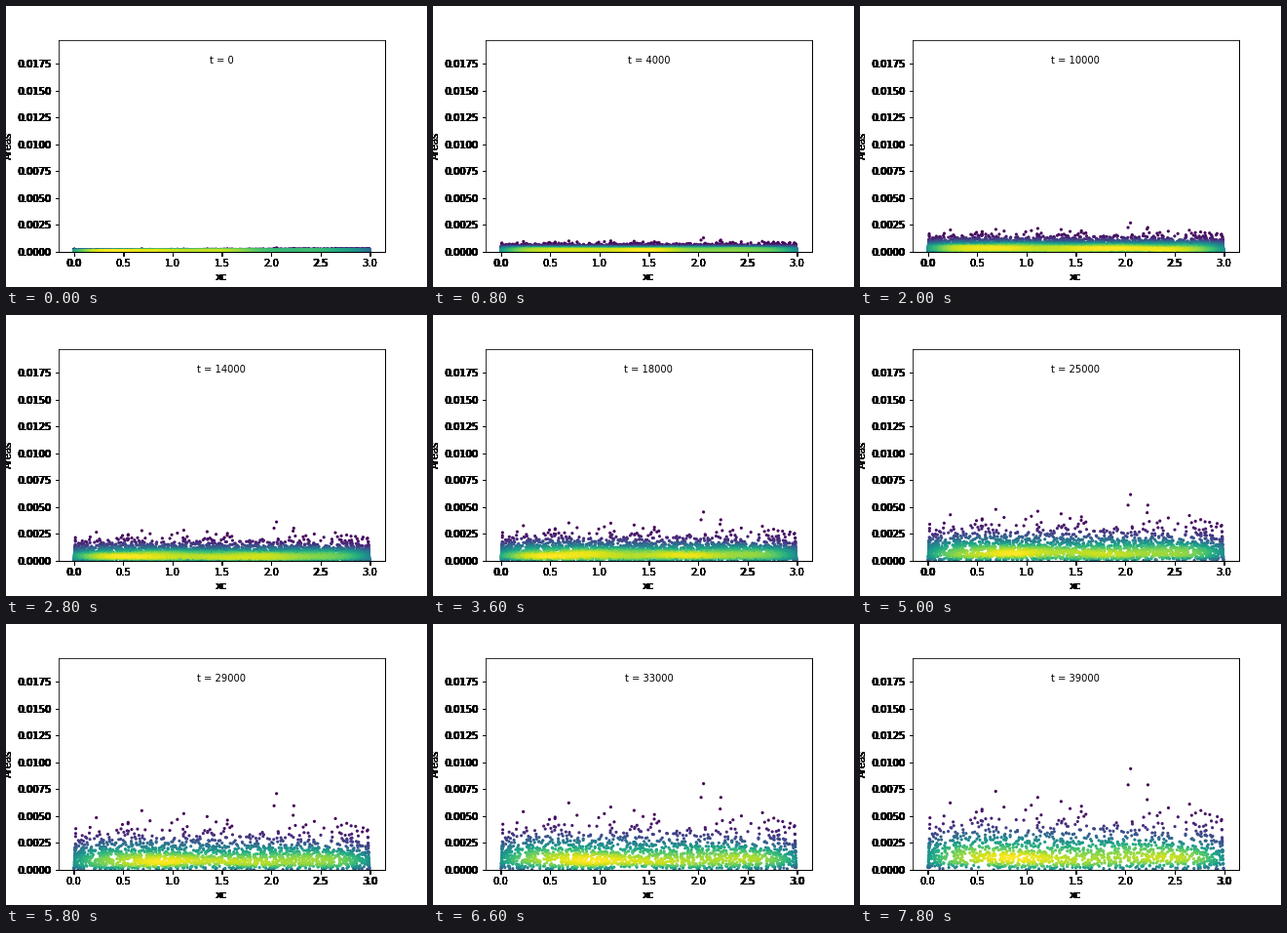
Write a matplotlib script that moves like this. It is 432 px wide and 288 px high and loops after 8 s.

```python
import numpy as np
import matplotlib.pyplot as plt
from matplotlib.animation import FuncAnimation

FRAMES, STEP_MS = 40, 200
N0 = 13000
RECT = [0.125, 0.125, 0.775, 0.755]
PX = 1 / 432
Y_TOP = 0.019716
BINS = 200

# Position and final area of the few largest cells
GIANT_X = np.array([2.055, 2.03, 2.23, 0.69])
GIANT_AREA = np.array([0.0094, 0.0079, 0.0079, 0.0073])

rng = np.random.default_rng(12)
rank = rng.permutation(np.linspace(0, 1 - 3 / N0, N0))
tilt = 0.15
home = 3 * (1 - np.sqrt(1 - rng.random(N0) * (2 * tilt - tilt**2))) / tilt
side = rng.random(N0)
at_left, at_right = side < 0.014, side > 0.986


def typical_area(t):
    return 0.00008 + 0.000049 * t


def cells(t):
    """Positions and areas of the cells still alive at time t (thousands)."""
    start = np.exp(-t / 1.5)
    scale = typical_area(t)
    share = min(1, 3 / scale / N0)
    alive = rank >= 1 - share
    q = (rank[alive] - 1 + share) / share
    x = home[alive]
    area = (scale + 0.00006 * start) * (-np.log(1 - q)) ** (1 / (1.5 + 1.8 * start))
    area *= 1 + start * (0.17 * x - 0.2)
    inset = 0.35 * np.sqrt(area)
    x = np.where(at_left[alive], 0, x)
    x = np.where(at_right[alive], 3, x)
    x = np.clip(x, inset, 3 - inset)
    giants = GIANT_AREA * scale / typical_area(FRAMES - 1)
    return np.append(x, GIANT_X), np.append(area, giants)


def smoother(sigma):
    i = np.arange(BINS)
    return np.exp(-0.5 * ((i[:, None] - i) / sigma) ** 2)


def density(x, y):
    """Gaussian density estimate (Scott's rule) on a grid, read at each point."""
    factor = len(x) ** (-1 / 6)
    ix = np.minimum((x / 3 * BINS).astype(int), BINS - 1)
    iy = np.minimum((y / y.max() * BINS).astype(int), BINS - 1)
    grid = np.zeros((BINS, BINS))
    np.add.at(grid, (ix, iy), 1)
    smooth = smoother(ix.std() * factor) @ grid @ smoother(iy.std() * factor)
    return smooth[ix, iy]


fig = plt.figure(figsize=(6, 4), dpi=72, facecolor="white")
ax = fig.add_axes(RECT)
ax.set_xlabel("xc")
ax.set_ylabel("Areas")
ax.set_ylim(0, Y_TOP)

# Stacked axes, half of them nudged, give the labels their heavy look
for i in range(8):
    nudge = i % 2
    left, *rest = RECT
    layer = fig.add_axes([left + 0.3 * nudge * PX, *rest],
                         sharex=ax, sharey=ax, label=f"layer{i}")
    layer.patch.set_visible(False)
    layer.spines[["top", "left"]].set_visible(False)
    layer.tick_params(axis="y", pad=3.5 + nudge)
    layer.set_xlabel("xc", x=0.5 - 0.003 * nudge)
    layer.set_ylabel("Areas", y=0.5 + 0.004 * nudge)

dots = ax.scatter([], [], s=10, linewidths=0, cmap="viridis", c=[])
clock = ax.text(0.5, 0.9, "", transform=ax.transAxes, ha="center", va="center")


def draw(i):
    x, y = cells(i)
    d = density(x, y)
    order = d.argsort()
    dots.set_offsets(np.column_stack([x, y])[order])
    dots.set_array(d[order])
    dots.set_clim(d.min(), d.max())
    half = 1.5 * 167.4 / (151.8 + 0.3 * (i / (FRAMES - 1)) ** 2)
    ax.set_xlim(1.5 - half, 1.5 + half)
    clock.set_text(f"t = {1000 * i}")
    return dots, clock


anim = FuncAnimation(fig, draw, frames=FRAMES, interval=STEP_MS,
                     repeat=True, repeat_delay=0, blit=False)
plt.show()
```
